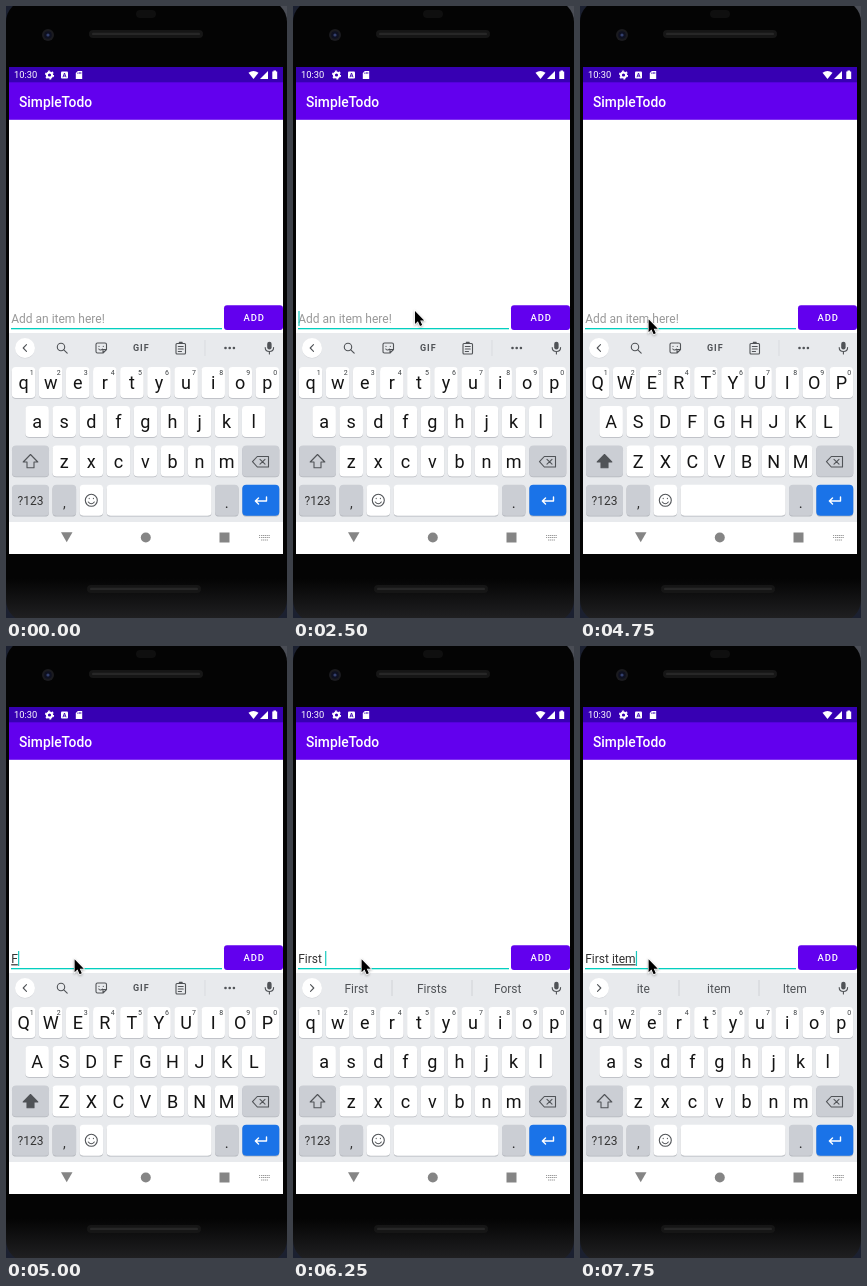
Animation, 281 px wide and 612 px high, one loop 8000 ms. Source, as an HTML page:

```html
<!DOCTYPE html>
<html lang="en">
<head>
<meta charset="utf-8">
<title>Todo app typing</title>
<style>
html, body { margin: 0; width: 100%; height: 100%; overflow: hidden; background: #000; }
svg { display: block; width: 281px; height: 612px; }
text { font-family: Roboto, "Open Sans", sans-serif; white-space: pre; }
.line { fill: none; stroke: #505357; stroke-width: 1.1; stroke-linecap: round; stroke-linejoin: round; }
.mid { text-anchor: middle; }
.key { font-size: 18px; fill: #141414; }
.num { font-size: 7px; fill: #3c4043; }
.sug { font-size: 12px; fill: #505357; }
.u { text-decoration: underline; text-decoration-color: #b5b5b5; text-decoration-thickness: 1px; }
#mouse { filter: drop-shadow(0 1px 1px rgb(0 0 0 / .3)); }
</style>
</head>
<body>
<svg viewBox="0 0 281 612">
  <defs>
    <linearGradient id="body" x2="0" y2="1">
      <stop offset=".93" stop-color="#040404"/>
      <stop offset="1" stop-color="#222224"/>
    </linearGradient>
  </defs>

  <!-- phone body -->
  <rect width="281" height="612" fill="#1b2030"/>
  <rect x="255" width="26" height="30" fill="#4a4d55"/>
  <rect x="0" y="-6" width="281" height="622" rx="22" fill="url(#body)"/>
  <rect x="83" y="24" width="114" height="8" rx="4" fill="#161616"/>
  <rect x="86" y="26.7" width="108" height="2.4" rx="1.2" fill="#272727"/>
  <rect x="81" y="579" width="114" height="8" rx="4" fill="#161616"/>
  <rect x="84" y="581.7" width="108" height="2.4" rx="1.2" fill="#272727"/>
  <rect x="130" y="4" width="20" height="8" rx="4" fill="#0f0f0f"/>
  <circle cx="42" cy="29" r="6" fill="#1b1b1f"/>
  <circle cx="42" cy="29" r="3.8" fill="#0e1020"/>
  <circle cx="42" cy="29" r="1.6" fill="#34406e"/>

  <!-- app -->
  <rect x="3" y="61" width="274" height="487" fill="#fff"/>
  <rect x="3" y="61" width="274" height="16" fill="#3700b3"/>
  <rect x="3" y="76.3" width="274" height="37.5" fill="#6200ee"/>
  <text x="8" y="72.3" font-size="9.3" fill="#fff">10:30</text>
  <g fill="#fff">
    <circle cx="43.5" cy="69" r="2.6" fill="none" stroke="#fff" stroke-width="2"/>
    <circle cx="43.5" cy="69" r="3.9" fill="none" stroke="#fff" stroke-width="1.4" stroke-dasharray="2 2.08"/>
    <rect x="55" y="65.5" width="7" height="7" rx="1"/>
    <path d="M57 71.2L58.5 67L60 71.2M57.6 70H59.4" fill="none" stroke="#3700b3" stroke-width=".9"/>
    <path d="M71.8 65H76.2V73H69.8V67Z"/>
    <path d="M71.8 66.5V68M73.3 66V68M74.8 66V68" stroke="#3700b3" stroke-width=".7"/>
    <path d="M242.5 66.8Q247.5 63 252.5 66.8L247.5 73Z"/>
    <path d="M254 73H262V65Z"/>
    <path d="M267.5 64.5H270V65.4H271.2V73H266.3V65.4H267.5Z"/>
  </g>
  <text x="13" y="100.9" font-size="13.8" font-weight="500" fill="#fff">SimpleTodo</text>

  <!-- input row -->
  <rect x="5" y="322" width="211" height="1.3" fill="#03cfc0"/>
  <text id="field" x="5.2" y="317.2" font-size="12"><tspan id="done"></tspan><tspan id="word" class="u"></tspan></text>
  <rect id="caret" y="305" width="1.2" height="15" fill="#1bcabf"/>
  <rect x="218" y="299.3" width="59" height="24.7" rx="3" fill="#6200ee"/>
  <text class="mid" x="248.2" y="315.3" font-size="9.5" font-weight="500" letter-spacing=".9" fill="#fff">ADD</text>

  <!-- keyboard -->
  <rect x="3" y="327" width="274" height="189" fill="#e8eaed"/>
  <circle cx="19" cy="342.6" r="10" fill="#d6d8dc"/>
  <circle cx="19" cy="342" r="10" fill="#fff"/>
  <path id="chevron" class="line"/>

  <g id="tools">
    <g class="line">
      <circle cx="55" cy="341" r="3.7"/><path d="M57.8 343.8L61.2 347.2"/>
      <path d="M91.5 337H99Q100.5 337 100.5 338.5V343.5L97 347H91.5Q90 347 90 345.5V338.5Q90 337 91.5 337ZM100.3 343.5H97V346.8M92.8 343Q94.5 345 96.5 343.2M93 340.3V340.4M97.3 340.3V340.4"/>
      <rect x="170" y="337.5" width="9.5" height="10.5" rx="1"/>
      <path d="M173 337.3H176.5M173.3 336.4H176.2M172.3 340.5H177.2M172.3 343H177.2M172.3 345.5H175.5"/>
    </g>
    <text class="mid" x="135.3" y="345.2" font-size="9" font-weight="700" letter-spacing="1" fill="#505357">GIF</text>
    <path d="M199 334V350" stroke="#d9dbdf"/>
    <g fill="#505357"><circle cx="219.5" cy="342" r="1.3"/><circle cx="223.7" cy="342" r="1.3"/><circle cx="227.9" cy="342" r="1.3"/></g>
  </g>
  <g id="hints">
    <path d="M99 334V350M179 334V350" stroke="#d0d2d6"/>
    <text class="sug mid" x="63.3" y="346.7"></text>
    <text class="sug mid" x="138.9" y="346.7"></text>
    <text class="sug mid" x="214.7" y="346.7"></text>
  </g>
  <rect x="261.2" y="335.8" width="4.4" height="7.6" rx="2.2" fill="#505357"/>
  <path class="line" d="M259.2 341.5Q259.2 345.5 263.4 345.5T267.6 341.5M263.4 345.5V348"/>

  <g id="keys"></g>

  <path id="shift" class="line" d="M24.5 448.5L31.8 456H28V461.8H21V456H17.2Z" stroke-linejoin="miter"/>
  <path class="line" d="M251.3 450.5H262.5V461H251.3L246.5 455.7ZM254 453.3L259 458.2M259 453.3L254 458.2"/>
  <text class="mid" x="24.5" y="499" font-size="12" fill="#333">?123</text>
  <text class="mid" x="58.3" y="501.5" font-size="14" fill="#333">,</text>
  <text class="mid" x="220.8" y="501.5" font-size="15" fill="#222">.</text>
  <circle class="line" cx="85.3" cy="494.3" r="6"/>
  <path class="line" d="M82.3 496Q85.3 499.6 88.3 496M83.2 492.3V492.6M87.4 492.3V492.6"/>
  <path class="line" d="M260.5 491V495H249.5M252.5 492L249.4 495L252.5 498" style="stroke:#fff;stroke-width:1.4"/>

  <!-- navigation bar -->
  <g fill="#858585">
    <path d="M55 526.3H66.5L60.7 536.3Z"/>
    <circle cx="139.8" cy="531.5" r="5"/>
    <rect x="213.5" y="526.5" width="10" height="10"/>
  </g>
  <path d="M253 529.5H264M253 531.5H264M255 534H262" stroke="#999" stroke-width="1.1" stroke-dasharray="1.3 .6"/>

  <path id="mouse" d="M0 0V13L2.9 10.3L5 15L7.2 14L5.2 9.4H9.2Z" fill="#000" stroke="#fff" stroke-width="1.4" paint-order="stroke"/>
</svg>

<script>
const LOOP = 8000;
const $ = id => document.getElementById(id);
const svgTag = (name, attrs, text = "") => {
  const el = document.createElementNS("http://www.w3.org/2000/svg", name);
  for (const k in attrs) el.setAttribute(k, attrs[k]);
  el.textContent = text;
  $("keys").append(el);
  return el;
};

const keyBox = (x, y, w, fill = "#fff") => {
  svgTag("rect", { x, y: y + .8, width: w, height: 31, rx: 4, fill: "#b4b7bd" });
  svgTag("rect", { x, y, width: w, height: 31, rx: 4, fill });
};

const letters = [];
const rows = [["qwertyuiop", 17.6, 361], ["asdfghjkl", 31.1, 400], ["zxcvbnm", 58.2, 439.5]];
for (const [chars, x0, y] of rows) {
  [...chars].forEach((ch, i) => {
    const x = x0 + i * 27.08;
    keyBox(x - 11.8, y, 23.6);
    letters.push(svgTag("text", { class: "mid key", x, y: y + 22.4 }, ch));
    if (y === 361) svgTag("text", { class: "mid num", x: x + 8, y: 369 }, (i + 1) % 10);
  });
}
const grey = "#cbced4";
keyBox(6, 439.5, 37, grey);
keyBox(236.3, 439.5, 37, grey);
keyBox(6, 478.8, 37, grey);
keyBox(46.5, 478.8, 23.6, grey);
keyBox(73.5, 478.8, 23.6);
keyBox(100.6, 478.8, 105);
keyBox(209, 478.8, 23.6, grey);
keyBox(236.3, 478.8, 37, "#1a73e8");

// time, finished text, word being composed, suggestions
const typing = [
  [0, "", "", ""],
  [5000, "", "F", ""],
  [5250, "", "Fi", "F|For|First"],
  [5500, "", "Fir", "Fi|Fit|First"],
  [5750, "", "Firs", "Fir|For|First"],
  [6000, "", "First", "Firs|First|Firsts"],
  [6250, "First ", "", "First|Firsts|Forst"],
  [6500, "First ", "", "of|time|and"],
  [7000, "First ", "i", "of|time|and"],
  [7250, "First ", "it", "i|I|item"],
  [7500, "First ", "ite", "it|item|its"],
  [7750, "First ", "item", "ite|item|Item"]
];

// time, x, y
const path = [
  [0, -40, -40], [1000, 192, 267], [1250, 192, 266], [1750, 192.7, 264],
  [2000, 200, 268], [2250, 184, 282], [2500, 122, 305],
  [2750, 70, 314.5], [3000, 69.5, 313.5], [3250, 68.6, 313.3]
];

const at = (list, t) => list.filter(step => step[0] <= t).pop();

function draw(t) {
  const [, done, word, sug] = at(typing, t);
  const [, mx, my] = at(path, t);
  const empty = !done && !word;
  const caps = t >= 4750 && t < 5250;

  $("done").textContent = empty ? "Add an item here!" : done;
  $("word").textContent = word;
  $("field").setAttribute("fill", empty ? "#999" : "#333");

  const blink = Math.floor((t + 250) / 500) % 2 === 1;
  const end = empty ? 0 : $("field").getComputedTextLength();
  $("caret").setAttribute("x", 5.4 + end);
  $("caret").style.display = !empty || blink ? "" : "none";

  $("tools").style.display = sug ? "none" : "";
  $("hints").style.display = sug ? "" : "none";
  const words = sug.split("|");
  document.querySelectorAll(".sug").forEach((el, i) => el.textContent = words[i] || "");
  $("chevron").setAttribute("d", sug ? "M17.5 338.7L20.8 342L17.5 345.3" : "M20.5 338.7L17.2 342L20.5 345.3");

  for (const el of letters) {
    const ch = el.textContent;
    el.textContent = caps ? ch.toUpperCase() : ch.toLowerCase();
  }
  $("shift").style.fill = caps ? "#505357" : "none";
  $("mouse").setAttribute("transform", `translate(${mx} ${my})`);
}

let last = -1;
function tick() {
  const t = Math.floor(performance.now() % LOOP / 250) * 250;
  if (t !== last) draw(last = t);
  requestAnimationFrame(tick);
}
tick();
</script>
</body>
</html>
```
